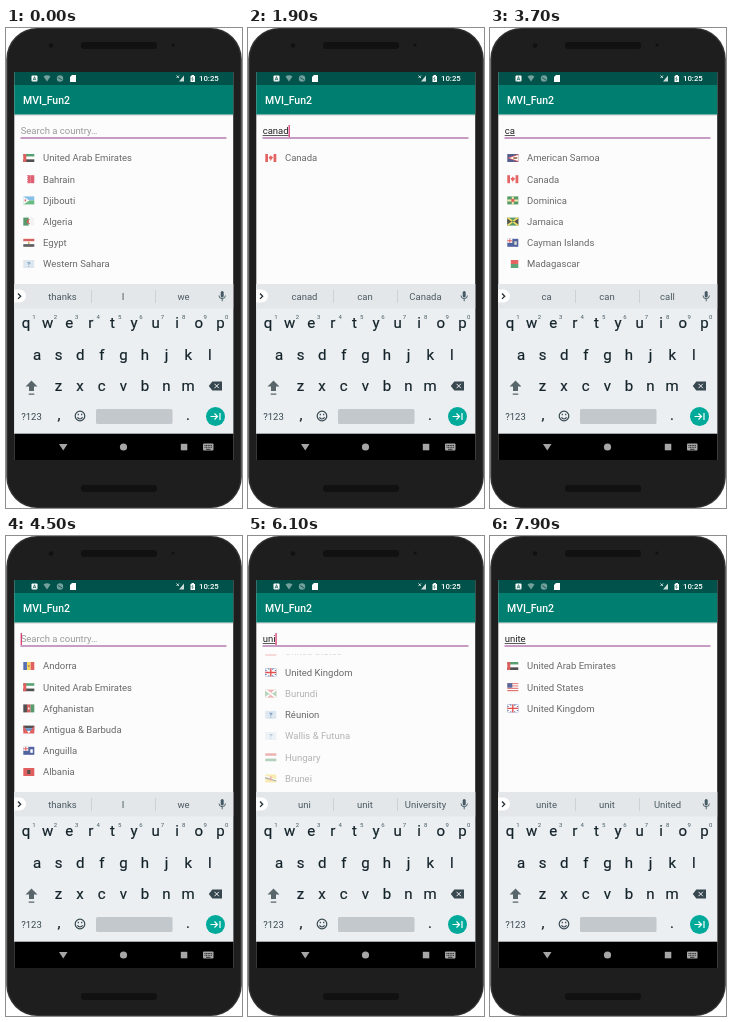
Recreate the animation shown at these times as an HTML page. Size 236 by 480 pixels, loop 8000 ms.

```html
<!DOCTYPE html>
<html lang="en">
<head>
<meta charset="utf-8">
<title>Country search</title>
<style>
html, body { margin: 0; width: 100%; height: 100%; overflow: hidden; background: #fff }
svg { display: block; width: 236px; height: 480px }
text { font: 9.5px Roboto, sans-serif; white-space: pre }
.mid { text-anchor: middle }
.key { font-size: 15px; fill: #14232a; stroke: #14232a; stroke-width: .2px }
.num { font-size: 6px; fill: #455a64 }
.word { fill: #4b5a62 }
.name { fill: #686868 }
</style>
</head>
<body>
<svg viewBox="0 0 236 480">
  <defs>
    <clipPath id="list"><rect x="8" y="118.800" width="220" height="133.700"/></clipPath>
    <clipPath id="screen"><rect x="8.300" y="44" width="218.900" height="388"/></clipPath>
  </defs>

  <!-- phone -->
  <rect x=".300" y="0" width="235.500" height="480" rx="31" fill="#343434"/>
  <rect x="1.800" y="1" width="232.500" height="478" rx="30" fill="#1e1e1e"/>
  <g fill="#111">
    <rect x="75" y="14" width="76" height="7" rx="3"/>
    <rect x="75" y="457" width="76" height="7" rx="3"/>
    <circle cx="45" cy="17.500" r="2.300"/>
    <circle cx="167" cy="17" r="1.500"/>
  </g>

  <g clip-path="url(#screen)">
  <rect x="8" y="44" width="220" height="388" fill="#fcfcfc"/>

  <!-- status and title bars -->
  <rect x="8" y="44" width="220" height="13" fill="#00524a"/>
  <rect x="8" y="57" width="220" height="29.500" fill="#007f70"/>
  <rect x="8" y="86.500" width="220" height="1.500" opacity=".1"/>
  <g fill="#fff">
    <rect x="25.500" y="47.500" width="6" height="6" rx="1"/>
    <path d="M27 52.500 28.500 48.700 30 52.500M27.600 51.300h1.800" fill="none" stroke="#00524a" stroke-width=".7"/>
    <path d="M37.500 48.500q3.500-2.500 7 0l-3.500 5z" opacity=".45"/>
    <circle cx="54" cy="50.500" r="3.200" opacity=".45"/>
    <path d="M52 49.500l4 2.500" stroke="#00524a" stroke-width=".8"/>
    <path d="M66 47h4v7h-6v-5z"/>
    <path d="M178 53.500h-5l5-6z" opacity=".8"/>
    <path d="m170.500 47.500 2.500 2.500m0-2.500-2.500 2.500" stroke="#fff" stroke-width=".8"/>
    <path d="M184.500 48h1v-1h2.500v1h1v6h-4.500z"/>
    <path d="M187 48.800l-1.300 2.200h1.600l-1.300 2" fill="none" stroke="#00524a" stroke-width=".6"/>
    <text x="193" y="53.300" style="font-size:7.800px;font-weight:500">10:25</text>
    <text x="17" y="76" style="font-size:10.500px;font-weight:500">MVI_Fun2</text>
  </g>

  <!-- search field -->
  <text id="hint" x="14.700" y="106.300" fill="#999">Search a country…</text>
  <text id="query" x="14.700" y="106.300" fill="#222"></text>
  <rect id="under" x="14.700" y="107.200" height=".8" fill="#333"/>
  <rect x="14.500" y="109.500" width="206" height="1" fill="#913f8c"/>
  <rect id="caret" y="97" width="1.100" height="12" fill="#d81b60"/>
  <g clip-path="url(#list)"><g id="rows"></g></g>

  <!-- keyboard -->
  <rect x="8" y="256" width="220" height="150" fill="#ebeff2"/>
  <rect x="8" y="256" width="220" height="24.500" fill="#e3e7ea"/>
  <path d="M85.500 262v13M149.500 262v13" stroke="#c6ccd0" stroke-width=".8"/>
  <path d="M8 261.500h5.500a6.500 6.500 0 0 1 0 13H8z" fill="#fff"/>
  <path d="m12 265.500 2.700 2.700-2.700 2.700" fill="none" stroke="#263238" stroke-width="1.300"/>
  <g id="words"></g>
  <g fill="#455a64">
    <rect x="214.700" y="263" width="3" height="6.500" rx="1.500"/>
    <path d="M213 267.500a3.200 3.200 0 0 0 6.400 0M216.200 270.700v2.600" fill="none" stroke="#455a64" stroke-width=".9"/>
  </g>
  <g id="keys"></g>
  <path d="m25.500 352.500 6 6h-3.500v4.500h-5v-4.500h-3.500zM22.700 365.500h5.600v1.200h-5.600z" fill="#58656b"/>
  <path d="m202.800 358 3.500-4.500h9.700v9h-9.700z" fill="#37474f"/>
  <path d="m208.500 355.800 4.400 4.400m0-4.400-4.400 4.400" stroke="#eceff1"/>
  <text class="mid" x="25.500" y="391.500" fill="#37474f">?123</text>
  <g fill="none" stroke="#37474f" stroke-width="1.200">
    <circle cx="74" cy="388" r="4.800"/>
    <path d="M71.500 389.300a2.700 2.700 0 0 0 5 0M72.300 385.700v1.500M75.700 385.700v1.500"/>
  </g>
  <rect x="90" y="381" width="76.500" height="15" rx="1.500" fill="#c2c8cc"/>
  <circle cx="209.500" cy="388.500" r="9.500" fill="#00aa9b"/>
  <path d="M204.500 388.500h7m-3-3 3 3-3 3M214 385v7" fill="none" stroke="#fff" stroke-width="1.200"/>

  <!-- navigation bar -->
  <rect x="8" y="405.700" width="220" height="27" fill="#000"/>
  <g fill="#a6a6a6">
    <path d="M53 416h8.500l-4.250 6.500z"/>
    <circle cx="117.500" cy="419" r="3.600"/>
    <rect x="174.800" y="415.800" width="6.500" height="6.500"/>
    <rect x="197" y="415.500" width="10.500" height="7" rx="1"/>
    <path d="M198.500 417.500h7.500M198.500 419.300h7.500" stroke="#000" stroke-width=".8" stroke-dasharray="1 .6"/>
    <path d="M200 421.300h4.500" stroke="#000" stroke-width=".7"/>
  </g>
  </g>
</svg>
<script>
const $ = id => document.getElementById(id);
const LOOP = 8000, TOP = 130, PITCH = 21.2, MOVE = 200, FADE = 100, TEXT_X = 14.7;

// Flags fill an 11 x 8 box: bands ("h" or "v"), then optional "colour path" shapes.
const jack = '#fff M0 0 2 0 11 7V8H9L0 1ZM11 0H9L0 7V8H2L11 1Z|#fff M4 0h3v8h-3zM0 2.500h11v3h-11z|#d33 M4.800 0h1.400v8h-1.400zM0 3.300h11v1.400h-11z';
const canton = '#fff M0 0h5v4h-5z|#d44 M2 0h1v4h-1zM0 1.500h5v1h-5z';
const star = '#fff M8 2h1.500v1.500h-1.500zM7 5h1v1h-1zM9 5h1v1h-1z';
const tint = '#d8e4ee,#d8e4ee';
const countries = {
  AE: ['United Arab Emirates', 'h', '#38925a,#fff,#333', '#dc4444 M0 0h3v8h-3z'],
  BH: ['Bahrain', 'v', '#fff,#d9475a,#d9475a', '#fff M3 0 5 1 3.500 2 5 3 3.500 4 5 5 3.500 6 5 7 3 8z'],
  DJ: ['Djibouti', 'h', '#72b5e5,#4fb06d', '#fff M0 0 6 4 0 8z|#d44 M1.300 3h1.500v2h-1.500z'],
  DZ: ['Algeria', 'v', '#3d8a55,#f2f2f2', '#d33 M7 2a2.300 2.300 0 1 0 0 4 1.800 1.800 0 0 1 0-4z'],
  EG: ['Egypt', 'h', '#d64545,#fff,#444', '#c9a445 M4.700 3h1.600v2h-1.600z'],
  EH: ['Western Sahara', 'h', tint, '#7d9fc0 M4 2h3v2h-1v1h-1v-2h-1zM5 6h1v1h-1z'],
  AS: ['American Samoa', 'h', '#35447e', '#d44 M11 0 0 4 11 8z|#fff M11 1 2 4 11 7z|#96693f M6 3h4v2h-4z'],
  CA: ['Canada', 'v', '#e04a4a,#fff,#fff,#e04a4a', '#e04a4a M5.500 1 6.300 2.500 7.800 3 6.500 5.500H5.800V7H5.200V5.500H4.500L3.200 3 4.700 2.500z'],
  DM: ['Dominica', 'h', '#3b8a50', '#f1e5a0 M4.500 0h2v8h-2zM0 3h11v2h-11z|#d44 M4 2.500h3v3h-3z'],
  JM: ['Jamaica', 'h', '#398a50', '#333 M0 0 5 4 0 8ZM11 0 6 4 11 8Z|#f3d44a M0 0H1.500L11 7V8H9.500L0 1ZM11 0H9.500L0 7V8H1.500L11 1Z'],
  KY: ['Cayman Islands', 'h', '#354a91', canton + '|#d9d4c4 M7 2.500h2.500v3.500h-2.500z'],
  MG: ['Madagascar', 'h', '#df4a45,#439563', '#fff M-.500-.500h4v9h-4z'],
  CF: ['Central African Republic', 'h', '#3a57a5,#fff,#45a05c,#f0d04a', '#d44 M4.700 0h1.600v8h-1.600z'],
  DO: ['Dominican Republic', 'h', '#3a57a5,#d44', '#fff M4.500 0h2v8h-2zM0 3h11v2h-11z'],
  VA: ['Vatican City', 'v', '#f1d44a,#fff', '#c9a445 M7.500 2.500h1.500v3h-1.500z'],
  AD: ['Andorra', 'v', '#3a57a5,#f1d44a,#d44', '#b5773f M4.700 3h1.600v2h-1.600z'],
  AF: ['Afghanistan', 'v', '#333,#c44,#3d8a55', '#fff M4.800 3h1.400v2h-1.400z'],
  AG: ['Antigua & Barbuda', 'h', '#333,#4a80c0,#fff', '#d44 M0 0 5.500 8H0ZM11 0 5.500 8H11Z'],
  AI: ['Anguilla', 'h', '#354a91', canton + '|#fff M7 2.500h2.500v3.500h-2.500z'],
  AL: ['Albania', 'h', '#d44', '#333 M4 2h3v4h-3z'],
  AU: ['Australia', 'h', '#354a91', canton + '|' + star],
  AW: ['Aruba', 'h', '#4a8fd0', '#f1d44a M0 5h11v.700h-11zM0 6.500h11v.700h-11z|#d44 M1.500 1.500h2v2h-2z'],
  BI: ['Burundi', 'h', '#d9534f', '#4aa35e M0 0 5 4 0 8ZM11 0 6 4 11 8Z|#fff M0 0H1.500L11 7V8H9.500L0 1ZM11 0H9.500L0 7V8H1.500L11 1ZM4 2.500h3v3h-3z'],
  GG: ['Guernsey', 'h', '#fff', '#df4a45 M4.500 0h2v8h-2zM0 3h11v2h-11z|#f1d44a M5.200 1.500h.600v5h-.600zM2 3.700h7v.600h-7z'],
  GU: ['Guam', 'h', '#354f93', '#d44 M4 4 5.500 1 7 4 5.500 7z|#9bd0e8 M5 3h1v2h-1z'],
  GY: ['Guyana', 'h', '#3f9a58', '#f3d44a M0 0 11 4 0 8z|#d44 M0 0 5 4 0 8z'],
  BM: ['Bermuda', 'h', '#d9484a', canton + '|#fff M7 2.500h2.500v3.500h-2.500z'],
  GB: ['United Kingdom', 'h', '#354a91', jack],
  RE: ['Réunion', 'h', tint, '#6f94bb M4 2h3v2h-1v1h-1v-2h-1zM5 6h1v1h-1z'],
  WF: ['Wallis & Futuna', 'h', tint, '#6f94bb M4 2h3v2h-1v1h-1v-2h-1zM5 6h1v1h-1z'],
  HU: ['Hungary', 'h', '#d9534f,#fff,#4a9663'],
  BN: ['Brunei', 'h', '#f1d44a', '#fff M0 1 11 5V6.500L0 2.500z|#444 M0 2.500 11 6V7L0 4z|#d44 M4.700 2h1.600v4h-1.600z'],
  US: ['United States', 'h', '#d9534f,#fff,#d9534f,#fff,#d9534f,#fff,#d9534f', '#3c4e8e M0 0h5v4.500h-5z'],
  TN: ['Tunisia', 'h', '#d9484a', '#fff M4 2.500h3v3h-3z'],
};

const edits = [
  [0, ''], [400, 'c'], [700, 'ca'], [1100, 'can'], [1400, 'cana'], [1700, 'canad'], [2100, 'canada'],
  [2600, 'canad'], [2750, 'cana'], [2900, 'can'], [3050, 'ca'], [4000, 'c'], [4150, ''],
  [4700, 'u'], [5000, 'un'], [5800, 'uni'], [6500, 'unit'], [7100, 'unite'],
];
const hints = {
  '': 'thanks I we', c: 'c can come', ca: 'ca can call', can: 'can can’t cancel', cana: 'cana can Canada',
  canad: 'canad can Canada', canada: 'canada Canada Canadian', u: 'u you us', un: 'un until understand',
  uni: 'uni unit University', unit: 'unit units United', unite: 'unite unit United',
};

// start, result list ("-" leaves a gap), first slot, offset that new rows travel from
const results = [
  [0, 'AE BH DJ DZ EG EH'],
  [700, 'AS CA DM JM KY MG', 0, 208],
  [1300, 'AS CA CF DO VA'],
  [1600, 'CA'],
  [3150, 'AS CA DM JM KY MG'],
  [4300, 'AD AE AF AG AI AL'],
  [4900, 'AU AW BI GG GU GY'],
  [5200, 'AU BI BM GG GU GY'],
  [5550, 'AE US GB BI RE WF HU BN', -2],
  [6050, 'AE US GB - RE', 0, -2 * PITCH],
  [6300, 'AE US GB RE TN'],
  [6800, 'AE US GB'],
].map(([start, codes, first = 0, shift = 0]) => {
  const slots = {};
  codes.split(' ').forEach((c, i) => { if (c !== '-') slots[c] = TOP + (first + i) * PITCH; });
  return { start, slots, shift };
});

const clamp = x => Math.max(0, Math.min(1, x));
const ease = x => (1 - Math.cos(Math.PI * clamp(x))) / 2;
const safe = s => s.replace('&', '&amp;');
const label = (cls, x, y, s) => `<text class="${cls}" x="${x}" y="${y}">${safe(s)}</text>`;

function flag(dir, bands, shapes) {
  const list = bands.split(','), n = list.length;
  const base = list.map((c, i) => dir === 'h'
    ? `<rect y="${8 * i / n}" width="11" height="${8 / n}" fill="${c}"/>`
    : `<rect x="${11 * i / n}" width="${11 / n}" height="8" fill="${c}"/>`);
  const top = shapes ? shapes.split('|').map(s => {
    const cut = s.indexOf(' ');
    return `<path fill="${s.slice(0, cut)}" d="${s.slice(cut + 1)}"/>`;
  }) : [];
  return base.concat(top).join('');
}

function row(code, y, alpha) {
  const [name, ...look] = countries[code];
  return `<g transform="translate(0 ${y})" opacity="${alpha}">
    <g transform="translate(17.300 -4)" opacity=".85">${flag(...look)}</g>${label('name', 37, 3.4, name)}</g>`;
}

function rows(t) {
  const k = results.findLastIndex(r => r.start <= t);
  const { start, slots, shift } = results[k];
  const old = k ? results[k - 1].slots : slots;
  const p = ease((t - start) / MOVE), fade = clamp((t - start) / FADE);
  let out = '';
  for (const c in old) if (!(c in slots) && fade < 1) out += row(c, old[c] + p * Math.max(0, -shift), 1 - fade);
  for (const c in slots) {
    const known = c in old, from = known ? old[c] : slots[c] + shift;
    out += row(c, from + (slots[c] - from) * p, known || shift ? 1 : fade);
  }
  return out;
}

function keyRow(letters, x, y) {
  return [...letters].map((c, i) => label('mid key', x + i * 21.6, y, c)).join('');
}
$('keys').innerHTML = keyRow('qwertyuiop', 20, 300) + keyRow('asdfghjkl', 31, 331.5) + keyRow('zxcvbnm', 52.5, 362.5)
  + [...'1234567890'].map((c, i) => label('mid num', 28 + i * 21.4, 290.5, c)).join('')
  + label('mid key', 53, 392, ',') + label('mid key', 182, 392, '.');

let shown = null;
function draw(now) {
  const t = now % LOOP;
  const [since, text] = edits.findLast(e => e[0] <= t);
  if (text !== shown) {
    shown = text;
    $('query').textContent = text;
    $('hint').style.display = text ? 'none' : '';
    $('words').innerHTML = hints[text].split(' ').map((w, i) => label('mid word', 56.5 + i * 60.5, 271.7, w)).join('');
  }
  const width = text ? $('query').getComputedTextLength() : 0;
  $('under').setAttribute('width', width);
  $('caret').setAttribute('x', TEXT_X + width);
  $('caret').style.display = since && (t - since) % 1000 < 500 ? '' : 'none';
  $('rows').innerHTML = rows(t);
}

const begin = performance.now();
(function tick() {
  draw(performance.now() - begin);
  requestAnimationFrame(tick);
})();
</script>
</body>
</html>
```
